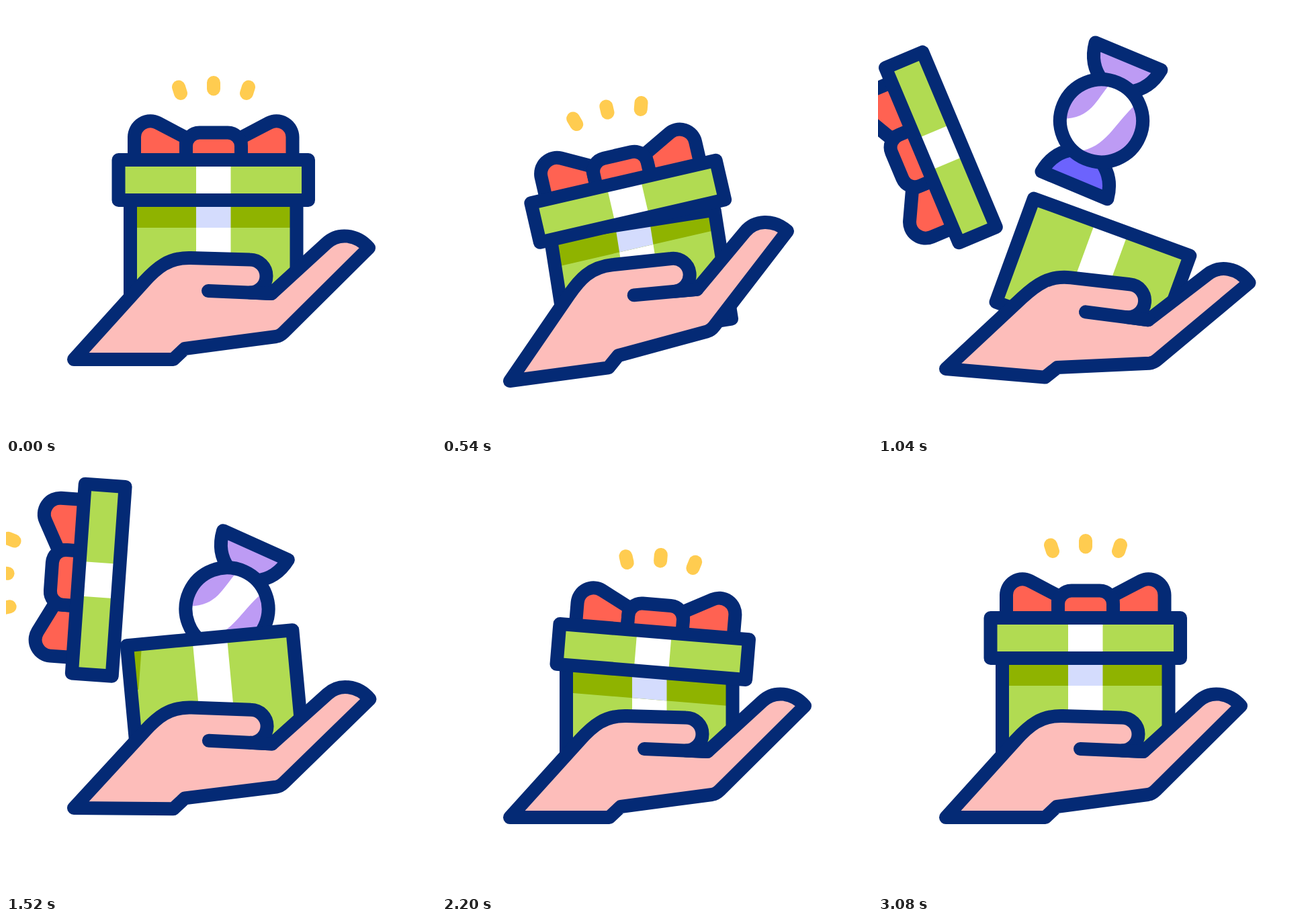
Recreate the animation shown at these times as an HTML page. Size 640 by 640 pixels, loop 3600 ms.

```html
<!DOCTYPE html>
<html lang="en">
<head>
<meta charset="utf-8">
<title>Gift in hand</title>
<style>
  html, body { margin: 0; width: 100%; height: 100%; overflow: hidden; background: #fff; }
  svg { display: block; width: 100%; height: 100%; }
  .line { stroke: #042a75; stroke-width: 20; stroke-linecap: round; stroke-linejoin: round; }
  .none { fill: none; }
  .green { fill: #b1db52; }
  .red { fill: #ff6252; }
  .white { fill: #fff; }
  .purple { fill: #bd9bf4; }
</style>
</head>
<body>
<svg viewBox="0 0 640 640">
  <defs>
    <clipPath id="shade"><rect class="lid" x="150" y="259" width="320" height="71"/></clipPath>
    <clipPath id="inside"><rect width="640" height="430"/></clipPath>
  </defs>

  <g clip-path="url(#inside)">
    <g id="candy">
      <path class="line purple" d="M-53-104H53C50-82 40-66 22-56H-22C-40-66-50-82-53-104Z"/>
      <path class="line" fill="#6c63fd" d="M-53 104H53C50 82 40 66 22 56H-22C-40 66-50 82-53 104Z"/>
      <circle class="purple" r="61.5"/>
      <path class="white" transform="rotate(-22.7)"
        d="M-58-3C-15-3-8-31 14-56A58 58 0 0 1 53-26C18 5 8 40-36 46A58 58 0 0 1-58-3Z"/>
      <circle class="line none" r="61.5"/>
    </g>
  </g>

  <g class="body">
    <rect class="green" x="185" y="289" width="247.5" height="164"/>
    <rect class="white" x="283" y="289" width="51.5" height="164"/>
  </g>
  <g clip-path="url(#shade)">
    <g class="body">
      <rect fill="#8fb300" x="185" y="289" width="247.5" height="164"/>
      <rect fill="#d4dcfd" x="283" y="289" width="51.5" height="164"/>
    </g>
  </g>
  <rect class="body line none" x="185" y="289" width="247.5" height="164"/>

  <g class="lid">
    <g id="sparks" fill="none" stroke="#ffcc50" stroke-width="20" stroke-linecap="round">
      <path d="M257 120.500L260 130M309 114V123.500M361 120.500L358 130"/>
    </g>
    <g class="line red">
      <path id="loop" d="M191 229V195A24 24 0 0 1 226 174L268 196V229"/>
      <use href="#loop" transform="matrix(-1 0 0 1 617.500 0)"/>
      <path d="M268 229V208.500A20 20 0 0 1 288 188.500H330A20 20 0 0 1 350 208.500V229"/>
    </g>
    <rect class="green" x="167.500" y="229" width="282.500" height="60"/>
    <rect class="white" x="283" y="229" width="51.500" height="60"/>
    <rect class="line none" x="167.500" y="229" width="282.500" height="60"/>
  </g>

  <g id="hand" class="line">
    <path fill="#fdbdba" d="M101 526H249L266 510L402 492Q408 491 413 486L540 360C522 339 494 337 477 353L395 428L363 426.500A24.500 24.500 0 0 0 363 377.500L275 375C242 374 224 390 205 411Z"/>
    <path class="none" d="M301 424L395 428"/>
  </g>
</svg>
<script>
const LOOP = 3600;

// Each key: time, x, y, angle.
const tracks = {
  hand: [
    [0, 0, 0, 0], [260, 0, 42, -9.6], [390, 0, 55, -12.6], [560, 0, 28, -6.8],
    [760, 0, -34, 5.4], [870, 0, -48, 9.9], [1040, 0, 14, 4.9], [1090, 0, 15, 3],
    [1520, 0, -14, 0.5], [1800, 0, 13, 4.6], [2160, 0, 0, 0]
  ],
  body: [
    [0, 0, 0, 0], [260, -0.5, 41, -13.5], [390, 0, 54, -17.7], [540, 0, 32, -9],
    [760, 2.3, -33, 9.8], [870, 0, -42, 16], [1040, -17, 30, 20.1], [1100, -15, 31, 17],
    [1520, 9.5, -31, -5.3], [1800, 0, 14, 4], [2160, 0, 0, 0]
  ],
  lid: [
    [0, 309, 259, 0], [260, 263.2, 305.4, -13.5], [390, 250, 322, -17.7],
    [540, 277, 291, -13], [760, 231.5, 149.5, -55.3], [880, 171, 146, -83],
    [1040, 93.5, 210, -112.7], [1120, 84, 224, -118], [1520, 137.5, 172.5, -86.1],
    [1620, 220, 167, -50], [1800, 299, 238, -12], [2020, 318, 277, 6],
    [2200, 314, 279.5, 4.7], [2420, 308, 238.5, -1], [2700, 309, 259, 0]
  ],
  candy: [
    [540, 310, 420, 10], [760, 334, 244, 37.7], [1040, 332.5, 171, 22.7],
    [1200, 331, 148, 16], [1520, 329, 215.5, 24.1], [1620, 325, 275, 22],
    [1820, 312, 425, 12]
  ]
};

// Smooth curve through the keys that never overshoots them.
function sample(keys, t, channel) {
  const last = keys.length - 1;
  if (t <= keys[0][0]) return keys[0][channel];
  if (t >= keys[last][0]) return keys[last][channel];
  const i = keys.findIndex(key => key[0] > t) - 1;
  const slope = n => (keys[n + 1][channel] - keys[n][channel]) / (keys[n + 1][0] - keys[n][0]);
  const tangent = n => {
    if (n === 0 || n === last) return 0;
    const a = slope(n - 1), b = slope(n);
    return a * b > 0 ? 2 * a * b / (a + b) : 0;
  };
  const span = keys[i + 1][0] - keys[i][0];
  const u = (t - keys[i][0]) / span;
  const v = 1 - u;
  return keys[i][channel] * v * v * (1 + 2 * u) + keys[i + 1][channel] * u * u * (3 - 2 * u)
    + span * u * v * (tangent(i) * v - tangent(i + 1) * u);
}

const pose = (name, t) => [1, 2, 3].map(channel => sample(tracks[name], t, channel));
const clamp = n => Math.max(0, Math.min(1, n));
const place = (selector, transform) =>
  document.querySelectorAll(selector).forEach(el => el.setAttribute('transform', transform));

const candy = document.getElementById('candy');
const sparks = document.getElementById('sparks');

function draw(t) {
  const [hx, hy, ha] = pose('hand', t);
  place('#hand', `translate(${hx} ${hy}) rotate(${ha} 101 526)`);

  const [bx, by, ba] = pose('body', t);
  place('.body', `translate(${bx} ${by}) rotate(${ba} 308.5 453)`);

  const [lx, ly, la] = pose('lid', t);
  place('.lid', `translate(${lx} ${ly}) rotate(${la}) translate(-309 -259)`);

  const [cx, cy, ca] = pose('candy', t);
  place('#candy', `translate(${cx} ${cy}) rotate(${ca})`);
  candy.style.display = t > 560 && t < 1800 ? '' : 'none';

  sparks.style.opacity = t < 1100 ? clamp((660 - t) / 100) : clamp((t - 1200) / 100);
}

const start = performance.now();
function tick() {
  draw((performance.now() - start) % LOOP);
  requestAnimationFrame(tick);
}
draw(0);
requestAnimationFrame(tick);
</script>
</body>
</html>
```
